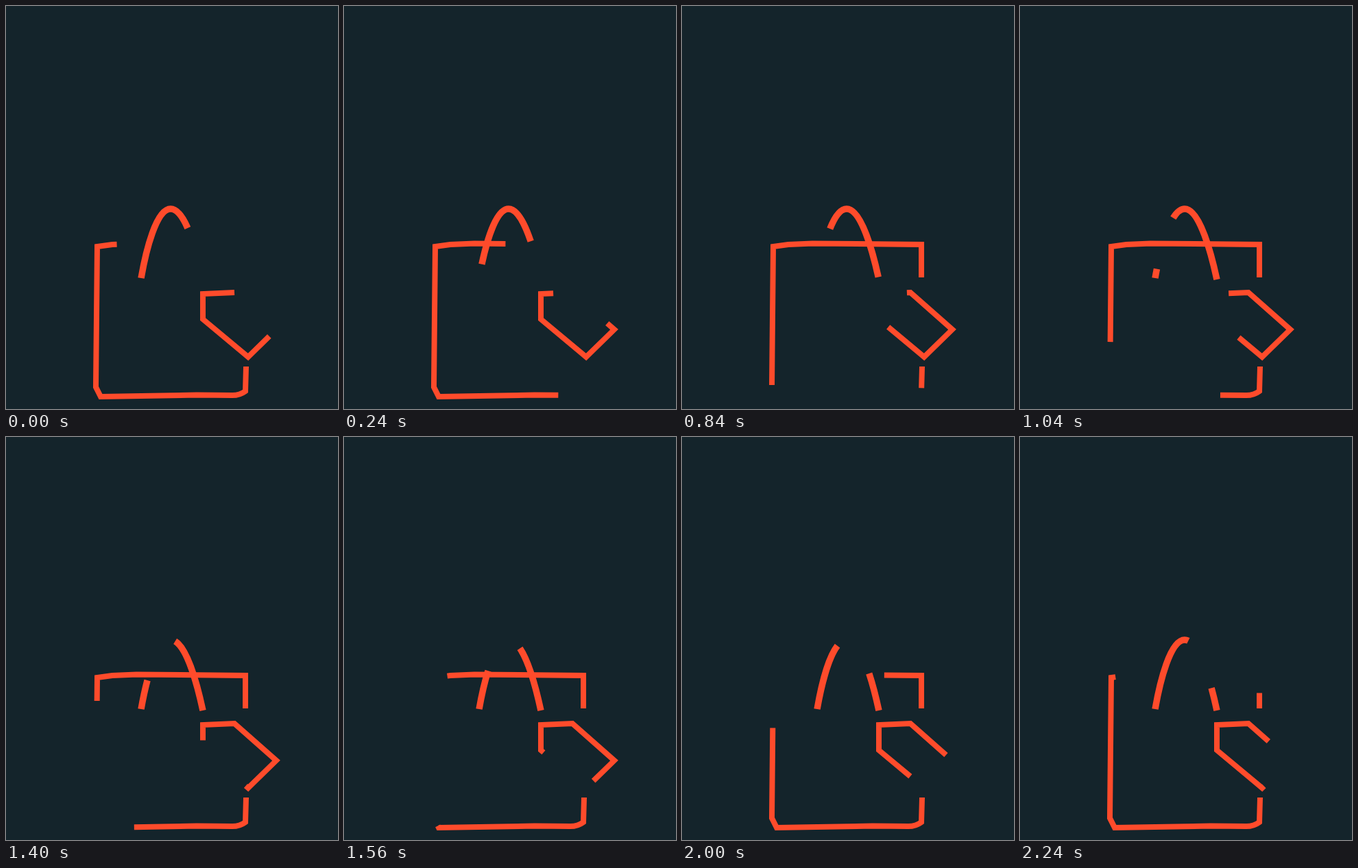
Recreate the animation shown at these times as an HTML page. Size 484 by 588 pixels, loop 2280 ms.

```html
<!DOCTYPE html>
<html lang="en">
<head>
<meta charset="utf-8">
<title>Bag and tag line loop</title>
<style>
  html, body { margin: 0; width: 100%; height: 100%; overflow: hidden; background: #14242b; }
  svg { display: block; width: 484px; height: 588px; }
  path { fill: none; stroke: #ff4b2b; stroke-miterlimit: 8; }
</style>
</head>
<body>
<svg viewBox="0 0 484 588"></svg>
<script>
const LOOP = 2280, STEP = 40;

// [time in ms, share of the travel]: nearly even pace with small lags
const PACE = [[0, 0], [520, .2253], [840, .3755], [1040, .464],
              [1400, .612], [1760, .7757], [2240, 1]];

const tagLap = 'L287 420V457L353 512L394 472L333 418';

// dash: visible length, travel: distance covered by the dash in one loop
const strokes = [
  { d: 'M350 526L349 562C345 565 338 568 330 568L278 567.5L138 570L131 556' +
       'L133 351L155 348L190 346.5L349 348V396',
    width: 8, dash: 497.7, travel: 710.7 },
  { d: 'M197 397C204 357 219 296 240 296C262 296 279 362 287 399',
    width: 9.5, dash: 153.5, travel: 198 },
  // two laps keep the corners joined when the dash passes the start
  { d: 'M333 418' + tagLap + tagLap, width: 8, dash: 212, travel: 268.5, gap: 999 }
];

const svg = document.querySelector('svg');
for (const s of strokes) {
  s.path = document.createElementNS('http://www.w3.org/2000/svg', 'path');
  s.path.setAttribute('d', s.d);
  svg.append(s.path);
  const gap = s.gap || s.path.getTotalLength() - s.dash;
  s.path.setAttribute('stroke-width', s.width);
  s.path.setAttribute('stroke-dasharray', s.dash + ' ' + gap);
}

function progress(t) {
  const i = PACE.findIndex(([time]) => time >= t);
  if (i < 1) return 0;
  const [t0, p0] = PACE[i - 1], [t1, p1] = PACE[i];
  return p0 + (p1 - p0) * (t - t0) / (t1 - t0);
}

function draw() {
  const t = Math.floor(performance.now() % LOOP / STEP) * STEP;
  const p = progress(t);
  for (const s of strokes) s.path.setAttribute('stroke-dashoffset', -p * s.travel);
  requestAnimationFrame(draw);
}
draw();
</script>
</body>
</html>
```
